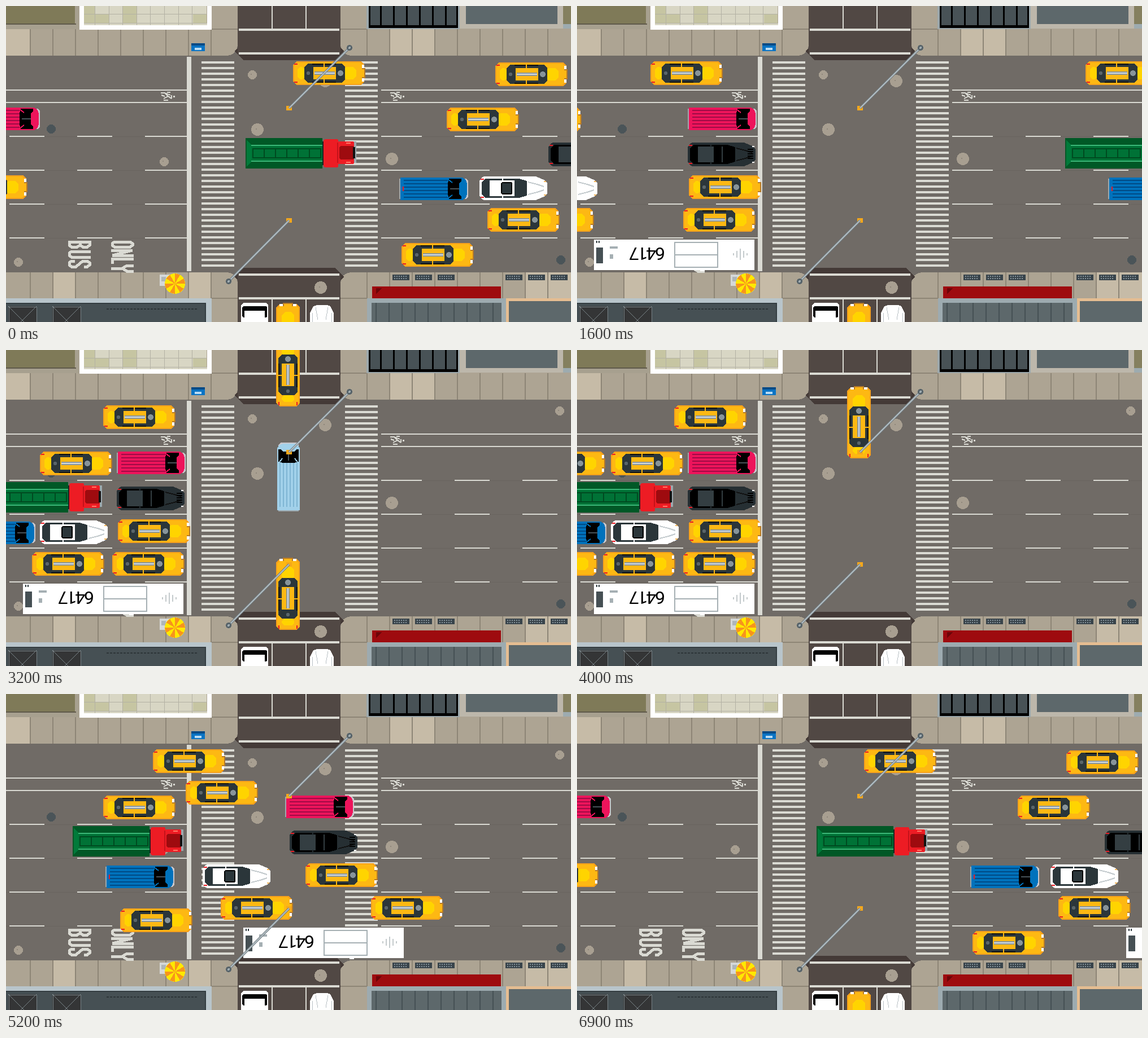
An HTML page for the animation above (7000 ms loop, 1000x560 px).

```html
<!DOCTYPE html>
<html lang="en">
<head>
<meta charset="utf-8">
<title>Crossroads</title>
<style>
  html, body { margin: 0; width: 100%; height: 100%; overflow: hidden; background: #706b66; }
  svg { display: block; width: 1000px; height: 560px; }
  text { font: 32px Roboto, "Liberation Sans", sans-serif; letter-spacing: -2.6px; }
</style>
</head>
<body>
<svg id="stage" viewBox="0 0 1000 560" shape-rendering="crispEdges"></svg>
<script>
const STEP = 100, STEPS = 70;
const paint = '#dadad3', walk = '#ada493', seam = '#8d8576', pale = '#c6bba7', slate = '#5d686b',
      dark = '#465054', glass = '#2b363a', amber = '#fdb813', street = '#514844', shade = '#443a37';

const rect = (x, y, w, h, fill) => `<rect x="${x}" y="${y}" width="${w}" height="${h}" fill="${fill}"/>`;
const shape = (d, fill) => `<path d="${d}" fill="${fill}"/>`;
const line = (d, color, width = 2) => `<path d="${d}" fill="none" stroke="${color}" stroke-width="${width}"/>`;
const disc = (x, y, r, fill) => `<circle cx="${x}" cy="${y}" r="${r}" fill="${fill}"/>`;
const group = (transform, art) => `<g transform="${transform}">${art}</g>`;
const repeat = (n, draw) => Array.from({ length: n }, (_, i) => draw(i)).join('');
// Box with corners cut by c.
const box = (x, y, w, h, c, fill) =>
  shape(`M${x + c} ${y}h${w - 2 * c}l${c} ${c}v${h - 2 * c}l${-c} ${c}h${2 * c - w}l${-c} ${-c}v${2 * c - h}z`, fill);
// The same part on both flanks of a vehicle of the given width.
const flanks = (width, x, y, w, h, fill) => rect(x, y, w, h, fill) + rect(x, width - y - h, w, h, fill);

function seeded(seed) {
  return () => (seed = (seed * 16807) % 2147483647) / 2147483647;
}

// Vehicles face right, with their top left corner at 0,0.
function taxi() {
  return box(0, 0, 126, 42, 6, '#f7a11b') + box(2, 2, 122, 38, 6, amber) +
    flanks(42, 2, 4, 6, 2, '#ed1c24') + flanks(42, 122, 6, 4, 6, '#fff') +
    rect(122, 12, 6, 18, '#b5792a') + rect(122, 14, 4, 14, amber) +
    box(8, 10, 12, 22, 4, '#ffd400') + box(88, 10, 24, 22, 6, '#ffd400') +
    box(20, 4, 72, 34, 6, glass) + rect(36, 10, 40, 22, amber) +
    flanks(42, 34, 4, 42, 2, '#111') + flanks(42, 54, 4, 2, 6, amber) +
    rect(38, 18, 36, 6, '#8796a0') + rect(38, 20, 36, 2, '#d5dce0') +
    disc(84, 21, 5, '#87949a') + disc(27, 21, 3, '#59656a');
}

function van(body, stripe, tail = '') {
  return rect(0, 2, 4, 36, '#9da9ae') + box(110, 2, 12, 36, 4, '#c9c7cc') +
    shape('M2 0H112L118 4L120 10V30L118 36L112 40H2Z', body) +
    repeat(6, i => rect(8, 4 + i * 6, 78, 2, stripe)) +
    shape('M88 2H110V6L106 10V30L110 34V38H88L86 30V10Z', '#000') +
    line('M86 3L94 9M86 37L94 31', body) + rect(90, 19, 16, 2, '#48545a') + tail;
}

function sedan(body, pane, roof, trim, extras) {
  return shape('M4 2L8 0H100L114 6L120 12V30L114 36L100 42H8L4 40L0 34V8Z', body) +
    flanks(42, 2, 4, 6, 2, '#ed1c24') +
    shape('M4 10L10 4H70L84 8V34L70 38H10L4 32Z', pane) + rect(18, 7, 44, 28, roof) +
    flanks(42, 40, 4, 2, 4, body) + line('M86 10L102 14L114 18M86 32L102 28L114 24', trim) + extras;
}

function truck() {
  return rect(0, 0, 136, 54, '#005826') + shape('M2 4L10 12V42L2 50Z', '#007a3a') +
    rect(10, 12, 126, 30, '#007236') + flanks(54, 10, 12, 126, 2, '#3cb878') +
    rect(12, 18, 122, 18, '#004a20') + repeat(6, i => rect(14 + i * 20, 20, 18, 14, '#007236')) +
    rect(136, 6, 4, 42, '#222') + rect(190, 6, 6, 38, '#9da9ae') +
    box(138, 2, 26, 50, 2, '#ed1c24') + box(160, 6, 32, 40, 2, '#ed1c24') + rect(162, 8, 2, 36, '#c4121a') +
    box(166, 14, 26, 24, 2, '#9e0b0f') + rect(190, 16, 4, 20, '#111') + flanks(52, 178, 8, 8, 2, '#ff7b68');
}

function bus() {
  const grey = '#a5afb3';
  return rect(0, 0, 284, 54, '#fff') + rect(188, 53, 8, 3, '#fff') + rect(4, 14, 12, 28, dark) +
    repeat(2, i => rect(4 + i * 4, 2, 2, 4, glass)) +
    rect(28, 12, 14, 4, grey) + rect(28, 26, 6, 8, grey) +
    group('translate(126 14) rotate(180)', '<text>6417</text>') +
    line('M143 5H219V49H143ZM143 27H219', grey) +
    repeat(5, i => { const h = 20 - 8 * Math.abs(i - 2); return rect(246 + i * 6, 26 - h / 2, 2, h, '#c4cacc'); });
}

function sidewalks() {
  const corner = (x, y, sx, sy) => group(`translate(${x} ${y}) scale(${sx} ${sy})`,
    shape('M0 0H410V66Q410 88 388 88H0Z', walk));
  const tile = (x, y) => rect(x, y, 40, 47, pale);
  const seams = (x, n) => repeat(n, i => line(`M${x + i * 40} 41V88M${x + i * 40} 472V519`, seam));
  return corner(0, 0, 1, 1) + corner(1002, 0, -1, 1) + corner(0, 560, 1, -1) + corner(1002, 560, -1, -1) +
    tile(3, 41) + tile(-37, 41) + tile(680, 41) + tile(720, 41) +
    tile(83, 472) + tile(323, 472) + tile(919, 472) + tile(960, 472) +
    seams(43, 9) + seams(639, 9) + line('M363 41H410M592 41H639M363 518H410M592 518H639', seam);
}

function sideStreet() {
  const kerb = shape('M404 80L410 74V86H592V74L598 80L582 96H420Z', shade);
  return rect(410, 0, 182, 86, street) + rect(410, 474, 182, 86, street) +
    kerb + group('translate(0 560) scale(1 -1)', kerb) +
    line('M471 0V40M531 0V40M471 520V560M531 520V560', paint) +
    [42, 84, 476, 518].map(y => rect(412, y - 2, 178, 4, paint)).join('');
}

function markings() {
  const lane = i => {
    const y = 231 + i * 60;
    const dashes = repeat(3, k => `M${6 + k * 120} ${y}h62M${(k ? 674 : 664) + k * 120} ${y}H${736 + k * 120}`);
    return line(`M0 ${y}H320M664 ${y}H1000`, '#69645f', 1) + line(dashes + `M300 ${y}H320`, paint);
  };
  const cyclist = x => group(`translate(${x} 152)`,
    line('M1 2H8L14 8L6 12M8 2L18 6M2 6L8 8M14 8L20 12M6 15H14M20 6V12M12 1H18', paint) + rect(23, 7, 3, 3, paint));
  const word = (x, d) => group(`translate(${x} 416) rotate(90)`, line(d, paint, 5));
  const oval = 'M2 6L5 2H8L11 6V34L8 38H5L2 34Z';
  return repeat(4, lane) + line('M0 149H320M0 171H320M664 149H1000M664 171H1000', paint) +
    rect(320, 90, 8, 380, paint) +
    repeat(37, i => rect(346, 98 + i * 10, 58, 4, paint) + rect(600, 98 + i * 10, 58, 4, paint)) +
    cyclist(273) + cyclist(679) +
    // Road lettering: BUS ONLY
    word(150, 'M2 2H8L11 6V14L8 19L11 24V34L8 38H2ZM2 19H8M19 0V34L22 38H26L29 34V0M46 12V6L43 2H39L36 6V14L46 26V34L43 38H39L36 34V28') +
    word(226, oval + 'M17 40V2L26 38V0M32 0V38H41M44 0V12L49 20L54 12V0M49 20V40');
}

function manholes() {
  const cover = (x, y, r) => disc(x, y, r, '#a89f91') + rect(x - 3, y - 2, 2, 2, '#8f877b');
  return cover(436, 122, 8) + cover(280, 276, 8) + cover(22, 454, 8) + cover(980, 108, 8) +
    cover(445, 219, 11) + cover(565, 133, 11) + cover(683, 271, 11) + cover(557, 499, 11) +
    disc(80, 218, 8, '#4a5458') + disc(982, 450, 8, '#4a5458');
}

function buildings() {
  const random = seeded(11);
  const vent = x => rect(x, 532, 50, 28, '#343536') +
    line(`M${x} 533h50v30M${x + 1} 532v30M${x} 532l28 28M${x + 50} 532l-28 28`, '#788286', 1);
  const tile = i => rect(133 + (i % 9) * 24.7, Math.floor(i / 9) * 15, 24.7, 15, random() < 0.3 ? '#c6c5a2' : '#d8d6c4');
  return rect(0, 0, 129, 41, '#a7a08f') + rect(0, 0, 122, 31, '#7f7a58') + rect(0, 31, 124, 2, '#5f594a') +
    repeat(18, tile) + rect(138, 30, 218, 4, '#d8d6c4') +
    repeat(8, i => rect(157 + Math.round(i * 24.6), 0, 1, 34, '#b3b1a4')) +
    rect(138, 14, 218, 1, '#b3b1a4') + rect(138, 30, 218, 1, '#b3b1a4') +
    line('M134 0V38H360V0', '#fff', 8) +
    rect(638, 0, 165, 41, '#9ca8ac') + rect(642, 0, 158, 39, '#000') + rect(645, 0, 152, 34, '#485256') +
    repeat(6, i => rect(662 + i * 23, 0, 3, 34, '#000')) +
    rect(803, 0, 183, 40, '#bdb7ab') + rect(814, 0, 162, 32, slate) +
    rect(986, 0, 14, 40, '#9dabb0') + rect(986, 0, 14, 32, '#85805f') +
    rect(0, 518, 364, 42, '#b8c5cb') + rect(0, 526, 354, 34, dark) + line('M0 527H353V560', '#343d41') +
    vent(4) + vent(82) +
    `<path d="M178 537H340" stroke="#2d3538" stroke-width="2" stroke-dasharray="4 2"/>` +
    rect(639, 518, 247, 42, '#9dabb0') + rect(647, 526, 230, 34, slate) +
    repeat(10, i => rect(654 + i * 23, 526, 2, 34, '#455054')) +
    rect(648, 497, 228, 21, '#9e0b0f') + shape('M655 500H665L655 510Z', '#6d0508') +
    rect(885, 518, 115, 42, '#e5bd91') + rect(890, 523, 110, 37, slate);
}

function streetFurniture() {
  const grate = x => rect(x, 476, 30, 10, '#39444b') +
    repeat(12, i => rect(x + 3 + (i % 6) * 4, i < 6 ? 478 : 482, 2, 2, '#84929b'));
  const rim = i => `${299 + 18 * Math.cos(i * Math.PI / 6)} ${492 + 18 * Math.sin(i * Math.PI / 6)}`;
  return repeat(3, i => grate(684 + i * 40) + grate(884 + i * 40)) +
    rect(328, 66, 24, 14, '#0b74c4') + rect(328, 66, 24, 4, '#074a86') + rect(334, 74, 12, 4, '#b9dcf5') +
    rect(272, 476, 18, 20, '#d5d8d9') + rect(275, 480, 8, 8, '#aeb6b9') +
    disc(299, 492, 18, '#ffe800') +
    repeat(6, i => shape(`M299 492L${rim(i * 2 + 1)}L${rim(i * 2 + 2)}Z`, '#f7941d'));
}

function parkedCars() {
  return box(416, 526, 48, 60, 4, '#fff') + box(418, 532, 44, 20, 2, '#000') + rect(422, 540, 36, 20, '#fff') +
    shape('M538 560V544L544 532L550 530H568L574 532L580 544V560Z', '#fff') +
    line('M548 534L552 556M570 534L566 556M542 544V560M576 544V560', '#b9c1c5', 1);
}

function lamp(x, y, tipX, tipY) {
  const pole = `M${x} ${y}L${tipX} ${tipY}`;
  return rect(tipX - 5, tipY - 4, 10, 8, '#f5a81c') +
    `<g shape-rendering="auto">${line(pole, '#6f7b81', 4) + line(pole, '#b4bfc4', 2)}</g>` +
    disc(x, y, 5, '#58646a') + disc(x, y, 2, '#9eabb1');
}

const sprites = {
  taxi: taxi(), truck: truck(), bus: bus(),
  pink: van('#ed145b', '#9e0b45'),
  blue: van('#0072bc', '#004a85', rect(6, 16, 2, 8, '#ed1c24')),
  sky: van('#a2d1ea', '#7fb5d3'),
  black: sedan('#262f33', '#000', '#343e42', '#111',
    rect(46, 7, 14, 28, '#000') + repeat(5, i => rect(106, 11 + i * 4, 10, 2, '#000')) + flanks(42, 114, 6, 4, 2, '#fff')),
  white: sedan('#fff', glass, '#fff', '#c4cbce',
    box(38, 10, 20, 22, 2, '#000') + rect(40, 12, 16, 18, glass) + flanks(42, 114, 8, 4, 2, '#f5b55a'))
};

// A vehicle cruises in, stands at `stop` from `arrive` to `depart` (in steps), then drives off at `speed`.
// Those still in view when the loop restarts go on at `exit`.
const traffic = [
  { kind: 'taxi', y: 98, stop: 172, arrive: 18.3, depart: 46, speed: 14.65, exit: 24.5 },
  { kind: 'pink', y: 180, stop: 196, arrive: 15, cruise: 17.2, depart: 42, speed: 29.8 },
  { kind: 'taxi', y: 180, drift: -80, stop: 60, arrive: 26, depart: 44, speed: 32.2, exit: 11.2 },
  { kind: 'taxi', y: 180, stop: -78, arrive: 36, depart: 45, speed: 35.75, exit: 35 },
  { kind: 'black', y: 242, stop: 196, arrive: 16, cruise: 19.7, depart: 40, speed: 25.46 },
  { kind: 'truck', y: 234, stop: -26, arrive: 26.4, depart: 44, speed: 18, exit: 27.5 },
  { kind: 'taxi', y: 300, stop: 198, arrive: 16, depart: 40, speed: 27.65 },
  { kind: 'white', y: 302, stop: 60, arrive: 24, depart: 42, speed: 28.8, exit: 16.5 },
  { kind: 'blue', y: 304, stop: -70, arrive: 25, depart: 44, speed: 30.64, exit: 15.2 },
  { kind: 'taxi', y: 358, stop: 188, arrive: 16, cruise: 19.8, depart: 40, speed: 38.1 },
  { kind: 'taxi', y: 358, stop: 46, arrive: 24, depart: 40, speed: 27.8, exit: 27.8 },
  { kind: 'taxi', y: 358, drift: 62, stop: -92, arrive: 38, depart: 42, speed: 29.33, exit: 18.75 },
  { kind: 'bus', y: 414, stop: 30, arrive: 16, cruise: 24.5, depart: 40, speed: 32.5 },
  // heading up the side street
  { kind: 'taxi', x: 478, length: 128, stop: 526, arrive: 64, cruise: 4.7, depart: 87.4, speed: 38 },
  { kind: 'sky', x: 480, length: 122, stop: 458, arrive: 25, cruise: 42, depart: 25, speed: 42 },
  { kind: 'taxi', x: 478, length: 128, stop: 368, arrive: 32, cruise: 38, depart: 32, speed: 38 }
];

const snap = v => Math.round(v / 2) * 2;
const LAST = STEPS - 1;

// Distance from the stopping place; the last and first step of the loop share one pose.
function travelled({ arrive, cruise = 18, depart, speed, exit = 0 }, t) {
  const incoming = t < 0 ? t + 1 : t;
  const outgoing = exit ? Math.min(t, LAST) : t;
  return speed * Math.max(0, outgoing - depart) + exit * Math.max(0, t - STEPS) - cruise * Math.max(0, arrive - incoming);
}

function place(car, t) {
  const way = travelled(car, t);
  if (car.length) return `translate(${car.x} ${snap(car.stop - way) + car.length}) rotate(-90)`;
  const change = Math.min(1, Math.max(0, (t - car.depart) / (LAST - car.depart)));
  return `translate(${snap(car.stop + way)} ${snap(car.y + (car.drift || 0) * change)})`;
}

const stage = document.getElementById('stage');
stage.innerHTML = '<defs>' + Object.entries(sprites).map(([id, art]) => `<g id="${id}">${art}</g>`).join('') + '</defs>' +
  rect(0, 0, 1000, 560, '#706b66') + sidewalks() + sideStreet() + markings() + manholes() +
  buildings() + streetFurniture() + parkedCars() +
  '<g id="traffic"></g>' + lamp(608, 74, 501, 181) + lamp(394, 488, 501, 380);

// Each vehicle may be seen in neighbouring laps of the loop.
const layer = document.getElementById('traffic');
const movers = traffic.flatMap(car => [-STEPS, 0, STEPS].map(lap => {
  const node = document.createElementNS('http://www.w3.org/2000/svg', 'use');
  node.setAttribute('href', '#' + car.kind);
  layer.append(node);
  return { car, lap, node };
}));

function render(step) {
  for (const { car, lap, node } of movers) node.setAttribute('transform', place(car, step + lap));
}

const start = performance.now();
function tick() {
  render(Math.floor((performance.now() - start) / STEP) % STEPS);
  requestAnimationFrame(tick);
}
tick();
</script>
</body>
</html>
```
